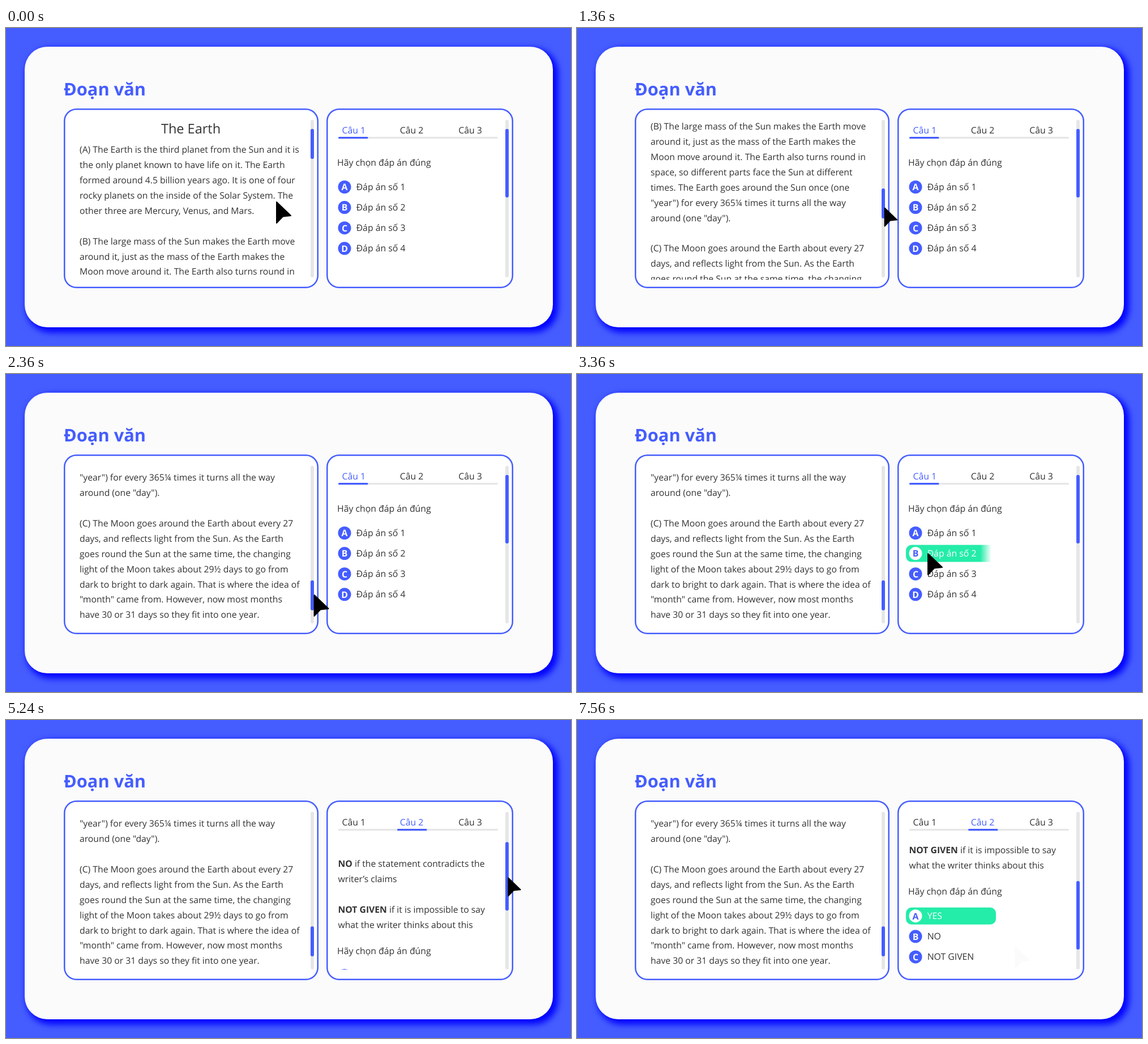
Write an HTML page that moves like this. It is 998 px wide and 561 px high and loops after 8000 ms.

```html
<!DOCTYPE html>
<html lang="vi">
<head>
<meta charset="utf-8">
<style>
  html, body { margin: 0; width: 100%; height: 100%; overflow: hidden; background: #455dff; }
  #card { position: absolute; left: 33px; top: 33px; width: 933px; height: 495px; border-radius: 40px;
    background: #fbfbfb; box-shadow: 6px 6px 12px 3px #00f; }
  svg { position: absolute; left: 0; top: 0; font: 15.8px "Open Sans", sans-serif; fill: #333; }
  text { white-space: pre; text-rendering: geometricPrecision; }
  .passage { font-size: 15.73px; }
  .blue { fill: #455dff; }
  .rail { fill: #e6e6e6; }
  .panel { fill: #fff; stroke: #455dff; stroke-width: 2.5; }
  .white { fill: #fff; }
  .bold { font-weight: 700; }
  .mid { text-anchor: middle; }
</style>
</head>
<body>
<div id="card"></div>
<svg id="stage" width="998" height="561" viewBox="0 0 998 561"></svg>
<script>
const PASSAGE = `(A) The Earth is the third planet from the Sun and it is
the only planet known to have life on it. The Earth
formed around 4.5 billion years ago. It is one of four
rocky planets on the inside of the Solar System. The
other three are Mercury, Venus, and Mars.

(B) The large mass of the Sun makes the Earth move
around it, just as the mass of the Earth makes the
Moon move around it. The Earth also turns round in
space, so different parts face the Sun at different
times. The Earth goes around the Sun once (one
"year") for every 365¼ times it turns all the way
around (one "day").

(C) The Moon goes around the Earth about every 27
days, and reflects light from the Sun. As the Earth
goes round the Sun at the same time, the changing
light of the Moon takes about 29½ days to go from
dark to bright to dark again. That is where the idea of
"month" came from. However, now most months
have 30 or 31 days so they fit into one year.`.split('\n');

const RULES = [
  ['YES', ' if the statement agrees with the'], ['', 'writer’s claims'], ['', ''],
  ['NO', ' if the statement contradicts the'], ['', 'writer’s claims'], ['', ''],
  ['NOT GIVEN', ' if it is impossible to say'], ['', 'what the writer thinks about this'],
];

const text = (x, y, s, attrs = '') => `<text x="${x}" y="${y}" ${attrs}>${s}</text>`;
const rect = (x, y, w, h, r, attrs) =>
  `<rect x="${x}" y="${y}" width="${w}" height="${h}" rx="${r}" ${attrs}/>`;

function option(letter, label, y, picked) {
  const [disc, ink] = picked ? ['white', 'blue'] : ['blue', 'white'];
  return `<circle cx="598" cy="${y}" r="11.5" class="${disc}"/>` +
    text(598, y + 5.8, letter, `class="bold mid ${ink}"`) +
    text(618.7, y + 5.4, label, picked ? 'class="white"' : '');
}
const options = (labels, y) => labels.map((s, i) => option('ABCD'[i], s, y + i * 36.1, false)).join('');

const pill = (id, letter, label, y) => `
  <linearGradient id="${id}" gradientUnits="userSpaceOnUse" y1="0" y2="0">
    <stop stop-color="#fff"/><stop offset="1" stop-color="#fff" stop-opacity="0"/></linearGradient>
  <mask id="${id}Mask" maskUnits="userSpaceOnUse" x="570" y="${y - 20}" width="180" height="40">
    ${rect(570, y - 20, 180, 40, 0, `fill="url(#${id})"`)}</mask>
  <g mask="url(#${id}Mask)">${rect(581, y - 15, 159, 30, 10, 'fill="#24eca9"')}${option(letter, label, y, true)}</g>`;

const $ = id => document.getElementById(id);

$('stage').innerHTML = `
  <clipPath id="leftClip"><rect x="120" y="167" width="412" height="277"/></clipPath>
  <clipPath id="rightClip"><rect x="576" y="210" width="296" height="230.5"/></clipPath>
  ${text(102, 118.5, 'Đoạn văn', 'class="bold blue" font-size="30.8"')}
  ${rect(103.25, 143.25, 447.5, 314.5, 21, 'class="panel"')}
  ${rect(567.25, 143.25, 327.5, 314.5, 21, 'class="panel"')}
  <g clip-path="url(#leftClip)"><g id="passage" class="passage">
    ${text(326.5, 186, 'The Earth', 'class="mid" font-size="23.5"')}
    ${PASSAGE.map((s, i) => text(130, 220 + i * 26.93, s)).join('')}
  </g></g>
  ${rect(538, 162, 6, 278, 3, 'class="rail"')}${rect(538, 178, 6, 53, 3, 'class="blue" id="leftThumb"')}
  ${rect(882, 162, 6, 278, 3, 'class="rail"')}${rect(882, 178, 6, 121, 3, 'class="blue" id="rightThumb"')}
  ${[593.5, 695.8, 799.2].map((x, i) => text(x, 186, `Câu ${i + 1}`, `id="tab${i}"`)).join('')}
  ${rect(587, 192, 282, 3.3, 1.6, 'class="rail"')}${rect(587, 192, 52.5, 3.3, 1.6, 'class="blue" id="underline"')}
  <g clip-path="url(#rightClip)">
    <g id="first">
      ${text(585, 242.5, 'Hãy chọn đáp án đúng')}
      ${options([1, 2, 3, 4].map(n => `Đáp án số ${n}`), 280.5)}
      ${pill('wipe1', 'B', 'Đáp án số 2', 316.6)}
    </g>
    <g id="second">
      ${RULES.map(([head, s], i) =>
        text(586.5, 234.8 + i * 27, `<tspan class="bold">${head}</tspan>${s}`, 'class="passage"')).join('')}
      ${text(585, 470, 'Hãy chọn đáp án đúng')}
      ${options(['YES', 'NO', 'NOT GIVEN'], 507.7)}
      ${pill('wipe2', 'A', 'YES', 507.7)}
    </g>
  </g>
  <path id="cursor" d="M-12.5-18.5 12.5 5.5-1.5 7-12.5 18.5Z" fill="#000" stroke="#000" stroke-width="2" stroke-linejoin="round"/>`;

// start, end, target centre
const MOVES = [
  [0, 400, 554.4, 233.3], [600, 2000, 554.4, 411], [2280, 3000, 632.5, 335.5],
  [3400, 4000, 735.5, 197.5], [4200, 4800, 898, 256.5], [5000, 5600, 898, 364.5],
  [5800, 6600, 619.5, 364.5], [7000, 7600, 789, 419.5],
];
// press start, press end, release start, release end
const PRESSES = [
  [400, 600, 2000, 2200], [3000, 3100, 3100, 3200], [4000, 4100, 4100, 4200],
  [4800, 5000, 5600, 5800], [6600, 6700, 6700, 6800],
];

function ease(t, from, to) {
  const u = Math.min(1, Math.max(0, (t - from) / (to - from)));
  return u * u * (3 - 2 * u);
}
const shift = (id, x, y) => $(id).setAttribute('transform', `translate(${x} ${y})`);

function wipe(id, p) {
  const edge = 581 + 179 * p;
  $(id).setAttribute('x1', edge - 20);
  $(id).setAttribute('x2', edge);
}

function draw(t) {
  let x = 490.5, y = 325.5, size = 1;
  for (const [from, to, tx, ty] of MOVES) {
    const p = ease(t, from, to);
    x += (tx - x) * p;
    y += (ty - y) * p;
  }
  for (const [a, b, c, d] of PRESSES) size -= 0.13 * (ease(t, a, b) - ease(t, c, d));
  $('cursor').setAttribute('transform', `translate(${x} ${y}) scale(${size})`);
  $('cursor').setAttribute('opacity', 1 - ease(t, 7000, 7600));

  shift('passage', 0, -328.2 * ease(t, 480, 2000));
  shift('leftThumb', 0, 186 * ease(t, 600, 2000));

  const push = 300 * ease(t, 4200, 4600), scroll = ease(t, 5000, 5600);
  shift('first', -push, 0);
  shift('second', 300 - push, -162 * scroll);
  shift('rightThumb', 0, 106 * scroll);
  shift('underline', 104 * ease(t, 4120, 4480), 0);
  const active = t < 4160 ? 0 : 1;
  for (let i = 0; i < 3; i++) $('tab' + i).setAttribute('class', i === active ? 'blue' : '');

  wipe('wipe1', ease(t, 3120, 3440));
  wipe('wipe2', ease(t, 6720, 7040));
}

const begin = performance.now();
function frame() {
  const t = (performance.now() - begin) % 8000;
  draw(Math.min(7560, Math.floor(t / 40) * 40));
  requestAnimationFrame(frame);
}
frame();
</script>
</body>
</html>
```
